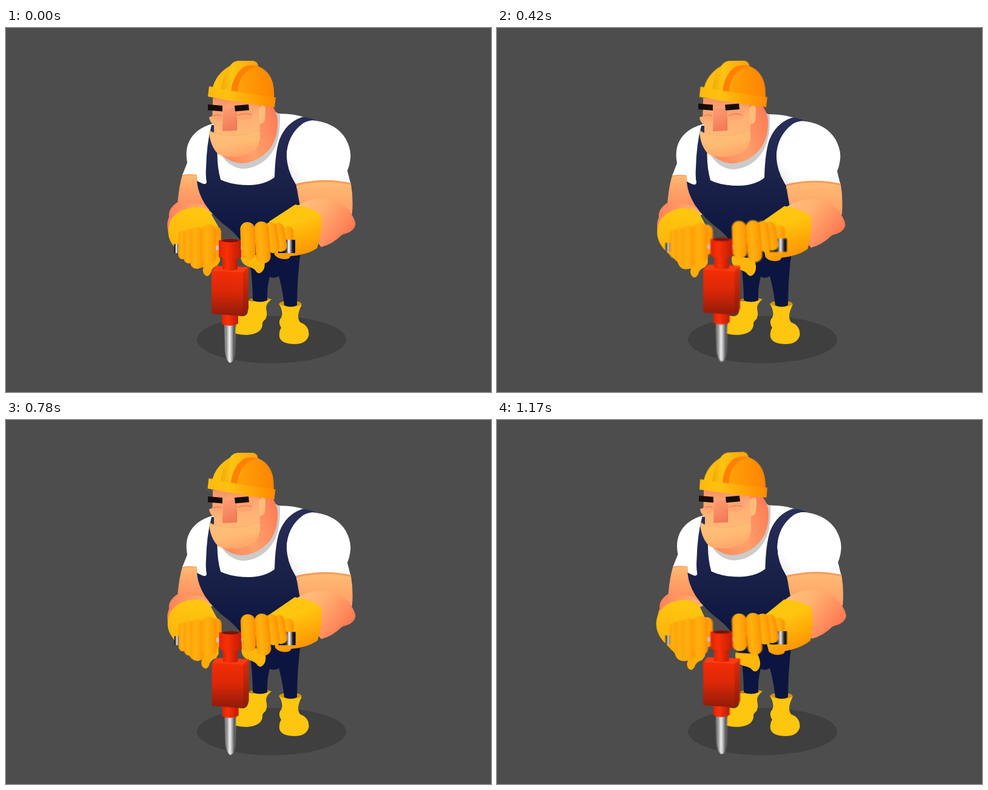
An HTML page for the animation above (1.2 s loop, 800 px wide and 600 px high).

```html
<!DOCTYPE html>
<html lang="en">
<head>
<meta charset="utf-8">
<title>Worker with jackhammer</title>
<style>
html, body { margin: 0; width: 100%; height: 100%; overflow: hidden; background: #4d4d4d; }
svg { display: block; width: 100vw; height: 100vh; }
</style>
</head>
<body>
<svg viewBox="0 0 800 600">
<defs>
  <linearGradient id="navy" x1="0" y1="0" x2="0" y2="1"><stop offset="0" stop-color="#292f58"/><stop offset=".5" stop-color="#1a2149"/><stop offset="1" stop-color="#0a143e"/></linearGradient>
  <linearGradient id="sleeve" x1="0" y1=".9" x2=".2" y2=".75"><stop offset="0" stop-color="#e9e9ec"/><stop offset="1" stop-color="#fff"/></linearGradient>
  <linearGradient id="neck" x1="0" y1=".7" x2="1" y2=".3"><stop offset=".1" stop-color="#ff8a5c"/><stop offset=".5" stop-color="#ffa06c"/><stop offset="1" stop-color="#ff7d55"/></linearGradient>
  <linearGradient id="face" x1="0" y1="0" x2="0" y2="1"><stop offset="0" stop-color="#f58f66"/><stop offset=".35" stop-color="#ffae74"/><stop offset="1" stop-color="#ffbc77"/></linearGradient>
  <linearGradient id="jaw" x1=".2" y1="0" x2=".6" y2="1"><stop offset="0" stop-color="#ffc07a"/><stop offset=".55" stop-color="#ffba73"/><stop offset="1" stop-color="#ffa468"/></linearGradient>
  <linearGradient id="nose" x1="0" y1="0" x2=".3" y2="1"><stop offset="0" stop-color="#ff9d72"/><stop offset="1" stop-color="#f27c58"/></linearGradient>
  <linearGradient id="arm" x1="0" y1="0" x2="0" y2="1"><stop offset="0" stop-color="#ffbc74"/><stop offset=".4" stop-color="#ffa369"/><stop offset="1" stop-color="#ff8a5c"/></linearGradient>
  <linearGradient id="foreR" x1="0" y1="0" x2="1" y2=".6"><stop offset=".1" stop-color="#ffc07a"/><stop offset=".45" stop-color="#ffb070"/><stop offset="1" stop-color="#ff7652"/></linearGradient>
  <linearGradient id="foreL"><stop offset="0" stop-color="#ff8059"/><stop offset="1" stop-color="#ffb573"/></linearGradient>
  <linearGradient id="dome"><stop offset="0" stop-color="#ffc410"/><stop offset=".35" stop-color="#fdb30c"/><stop offset=".45" stop-color="#ff9f08"/><stop offset="1" stop-color="#ff8400"/></linearGradient>
  <linearGradient id="ridge"><stop offset="0" stop-color="#eea905"/><stop offset=".3" stop-color="#ffc412"/><stop offset="1" stop-color="#ffa108"/></linearGradient>
  <linearGradient id="brim"><stop offset="0" stop-color="#ffb90e"/><stop offset=".3" stop-color="#fdc010"/><stop offset="1" stop-color="#ff8a00"/></linearGradient>
  <linearGradient id="gloveL" x1=".5" y1="0" x2=".4" y2="1"><stop offset=".1" stop-color="#ffc50f"/><stop offset=".65" stop-color="#ffb30a"/><stop offset="1" stop-color="#ffa808"/></linearGradient>
  <linearGradient id="gloveR" x1=".3" y1="0" x2=".65" y2="1"><stop offset=".35" stop-color="#ffc50f"/><stop offset="1" stop-color="#ff8f00"/></linearGradient>
  <linearGradient id="finger"><stop offset="0" stop-color="#ffa006"/><stop offset=".35" stop-color="#ffb110"/><stop offset=".7" stop-color="#ffa409"/><stop offset="1" stop-color="#ff8d02"/></linearGradient>
  <linearGradient id="grip"><stop offset="0" stop-color="#111"/><stop offset=".2" stop-color="#444"/><stop offset=".42" stop-color="#fff"/><stop offset=".75" stop-color="#222"/><stop offset="1" stop-color="#000"/></linearGradient>
  <linearGradient id="steel"><stop offset="0" stop-color="#808080"/><stop offset=".2" stop-color="#909090"/><stop offset=".45" stop-color="#f4f4f4"/><stop offset=".65" stop-color="#aaa"/><stop offset=".85" stop-color="#505050"/><stop offset="1" stop-color="#888"/></linearGradient>
  <linearGradient id="tube"><stop offset="0" stop-color="#dc2504"/><stop offset=".35" stop-color="#fb3006"/><stop offset="1" stop-color="#bd1b06"/></linearGradient>
  <linearGradient id="front" x1="0" y1="0" x2="0" y2="1"><stop offset="0" stop-color="#f42d06"/><stop offset=".45" stop-color="#dc2807"/><stop offset="1" stop-color="#8f1b0a"/></linearGradient>
  <linearGradient id="side" x1="0" y1="0" x2="0" y2="1"><stop offset="0" stop-color="#dc2c0a"/><stop offset="1" stop-color="#8c1a08"/></linearGradient>
  <filter id="shake" filterUnits="userSpaceOnUse" x="250" y="300" width="260" height="270" color-interpolation-filters="sRGB"><feGaussianBlur/></filter>
  <filter id="soft" color-interpolation-filters="sRGB"><feGaussianBlur stdDeviation=".5"/></filter>
</defs>

<rect width="800" height="600" fill="#4d4d4d"/>
<ellipse cx="438" cy="513.5" rx="123" ry="39" fill="#3f3f3f"/>

<g fill="#ffc60f">
  <path d="M400 448Q418 440 438 447L425 456Z" fill="#cf9500"/>
  <ellipse cx="469" cy="455" rx="18.5" ry="5.5" fill="#cf9500"/>
  <path d="M398 449Q418 454 438 447Q428 455 429 463Q432 472 428 480Q422 484 423 490Q421 504 398 506Q385 506 377 503L383 474Q397 478 399 468Z"/>
  <path d="M450 455Q468 464 488 456Q483 465 482 474Q482 484 487 486Q500 491 499.500 506Q496 521 476 521Q454 521 451 509Q450 500 454 494Q449 487 452 480Q457 474 455 467Q454 460 450 455Z"/>
</g>
<path d="M385 345L404 398Q407 425 407 449Q419 454 431 449Q430 428 435 410Q442 414 450 409Q456 430 459 457Q470 462 480 457Q480 410 487 360Z" fill="#0b153f"/>

<g id="body">
  <path d="M291 242Q302 239 318 242L322 270L345 300L310 302L283 290Q285 262 291 242Z" fill="url(#arm)"/>
  <path d="M291 242.500Q302 240 316 242" fill="none" stroke="#f79b58" stroke-width="2.500"/>
  <path d="M283 287Q298 288 324 291L341 306L272 346Q262 327 269 311Q267 298 283 287Z" fill="url(#foreL)"/>
  <path d="M340 158L445 141Q478 141 493 148L520 156L500 260L430 275L340 265L316 253L315 242Q303 240 291 242L299 222Q295 202 302 187Q312 166 340 158Z" fill="#fff"/>
  <path d="M339 160Q331 190 330 230Q329 245 331 254Q330 259 323 256L315 252Q316 270 328 290Q343 312 366 329Q380 340 388 352L460 365Q478 340 485 290Q480 275 479 258Q464 235 463 210Q464 176 490 157Q500 151 513 153Q499 146 488 147Q462 156 451 184Q444 205 443 246Q428 258 402 259Q372 259 354 250Q347 225 349 195L352 160Z" fill="url(#navy)"/>
  <path d="M512 153Q545 158 560 182Q570 200 568 215Q567 226 563 235L569 259Q525 246 479 259Q463 235 463 209Q464 178 490 158Q500 151 512 153Z" fill="url(#sleeve)"/>
  <path d="M354 208Q370 232 393 232Q426 229 443 198Q453 178 452 143L440 135Z" fill="#cbcbcb"/>
  <path d="M479 258Q525 247 569 257Q573 280 571 305L556 340L520 361L480 300Q486 293 484 288Z" fill="url(#arm)"/>
  <path d="M479 258Q525 247 569 257" fill="none" stroke="#f79b58" stroke-width="3"/>
  <path d="M470 302Q490 282 520 281Q552 282 568 304Q578 319 576 326Q572 337 555 340Q538 357 520 361Z" fill="url(#foreR)"/>
</g>

<g id="head">
  <path d="M352 206Q370 223 390 223Q418 221 436 198Q449 180 448 152Q446 132 432 122L345 118Z" fill="url(#neck)"/>
  <path d="M341 115L416 122L417 131Q426 124 428 132L427 151Q426 158 419 158L419 185L343 185L343 160Q336 155 335 147L341 145Z" fill="url(#face)"/>
  <path d="M417 132Q427 123 428 134L427 151Q426 158 418 158Z" fill="#ffbc79"/>
  <path d="M335 169Q344 176 372 177Q397 177 419 169Q419 188 415 196Q405 210 378 212Q358 213 350 208Q336 194 335 169Z" fill="url(#jaw)"/>
  <path d="M336 169Q344 176 372 177Q397 177 418 169" fill="none" stroke="#ffac6e"/>
  <path d="M340 136L357 138L357 152Q349 156 340 148ZM380 137L408 136Q411 146 401 150Q390 153 380 149Z" fill="#ff9b6d" opacity=".5"/>
  <path d="M358 132L381 132L381 169L357 170Z" fill="url(#nose)"/>
  <path d="M380.500 148V169" stroke="#d96a48" opacity=".6"/>
  <path d="M343 145Q349 141 356 145M383 144Q393 139 405 143" fill="none" stroke="#e87d58" stroke-width="1.400"/>
</g>
<path id="brows" d="M333 126L357 128L357 137.500L333 135.500ZM377 128L400 126L401 135.500L378 137.500Z" fill="#190b09"/>
<g id="helmet" filter="url(#soft)">
  <path d="M340 102Q345 76 370 62Q375 54 384 54L407 54Q415 55 416 63Q434 70 440 90Q443 102 442 118Z" fill="url(#dome)"/>
  <path d="M354 104Q358 76 371 61Q376 54 387 54L407 54Q415 55 416 63Q402 64 393 74L380 108Z" fill="url(#ridge)"/>
  <path d="M371 107Q373 80 390 66Q400 59 416 63Q398 67 390 80Q383 92 382 108Z" fill="#ff8100"/>
  <path d="M335 96Q385 107 445 114.500L443 131Q384 123 333 113Z" fill="url(#brim)"/>
</g>

<g id="left" fill="url(#gloveL)">
  <path d="M271 318Q285 297 312 295Q330 295 338 306L350 327L353 384L349 391Q339 395 338 403Q333 413 327 406Q323 400 326 394Q308 400 303 384L283 367C268 352 264 338 271 318Z"/>
</g>
<g id="right" fill="url(#gloveR)">
  <path d="M434 319L477 291Q505 296 520 309Q522 338 513 363Q497 374 469 376Q469 381 459 381Q449 381 443 374Z"/>
  <path d="M388 370Q384 387 399 393Q410 396 413 402Q419 408 425 398Q429 390 424 376Z" fill="#ffb70c"/>
</g>

<g id="drill" filter="url(#shake)">
  <rect x="455" y="327" width="19" height="26" rx="9" fill="url(#finger)"/>
  <rect x="277" y="356" width="10" height="15" rx="1" fill="url(#grip)"/>
  <path d="M449 364H476V371H449Z" fill="#111"/>
  <rect x="459" y="349" width="18" height="22" rx="1" fill="url(#grip)"/>
  <g id="fingers" fill="url(#finger)"></g>
  <path d="M346 359H352V366H346ZM383 359H389V366H383Z" fill="#c4c4c4"/>
  <path d="M360 488H379L378 538Q375 552 369 552Q362 547 361 531Z" fill="url(#steel)"/>
  <path d="M356 470H383V487Q370 494 356 488Z" fill="url(#tube)"/>
  <path d="M339 401L346 392L400 394L391 404Z" fill="#ff3d12"/>
  <path d="M391 403L400 394V462Q399 471 391 475Z" fill="url(#side)"/>
  <path d="M339 400L391 403V475L339 471Z" fill="url(#front)"/>
  <path d="M357 376H382V398Q370 402 357 398Z" fill="url(#tube)"/>
  <path d="M351 350Q369 345 387 350L388 378Q370 384 351 378Z" fill="url(#tube)"/>
  <ellipse cx="369.500" cy="350.500" rx="14" ry="2.800" fill="#7b1207"/>
</g>
</svg>

<script>
const $ = id => document.getElementById(id);
const STEP = 30, COUNT = 40;

// x, y, width, height, tilt
const fingers = [
  [334, 326, 21, 50, 0], [284, 334, 15, 47, 0], [293, 331, 18, 57, 0], [304, 328, 22, 69, 0], [322, 324, 25, 65, 0],
  [441, 321, 20, 48, -10], [429, 320, 20, 51, -8], [411, 319, 24, 69, -4], [387, 320, 24, 62, -2]
];
for (const [x, y, width, height, tilt] of fingers) {
  const r = document.createElementNS("http://www.w3.org/2000/svg", "rect");
  const attrs = { x, y, width, height, rx: width / 2.1, transform: `rotate(${tilt} ${x + width / 2} ${y + height / 2})` };
  for (const k in attrs) r.setAttribute(k, attrs[k]);
  $("fingers").append(r);
}

// Key poses; each channel wanders between them.
const keys = [0, 5, 14, 20, 26, 35, 39, 40];
const tracks = {
  bodyX:   [0, 1, -2, -1.4, 0, -.7, -.6],
  bodyY:   [0, .4, 1, -.6, 0, -.4, -.5],
  headX:   [0, 0, -1, -.3, 0, 0, 0],
  headY:   [0, 0, .3, -.3, 0, 0, -.3],
  browY:   [0, -.9, -1.4, .3, 0, 0, -1.3],
  helmetX: [0, 1, .8, -1, -.5, 0, .8],
  helmetY: [0, .4, 0, -1, 0, .2, -.8],
  helmetR: [0, -1, -.6, -1.2, 0, 0, -2.4],
  drillX:  [0, -1.8, 1, .6, .6, -3, 1],
  drillY:  [0, -1.8, -2, -.8, .2, 1.3, -1],
  leftR:   [0, .4, 2, 1.3, 1.4, .6, 5.7],
  rightR:  [0, -1.2, -1.9, -1, -1.3, -.4, -6],
  blurX:   [.6, 1.7, 1.3, .9, .4, 1.6, 1.2],
  blurY:   [.3, 1, .9, .4, .2, .7, .5]
};
const jitter = { drillX: 1.2, drillY: 1, leftR: .8, rightR: .8, helmetX: .3, helmetY: .3 };

function sample(name, frame, seed) {
  const v = tracks[name];
  let i = 0;
  while (frame >= keys[i + 1]) i++;
  const u = (frame - keys[i]) / (keys[i + 1] - keys[i]);
  const ease = u * u * (3 - 2 * u);
  const noise = Math.sin(frame * 2.4 + seed * 1.9) * Math.sin(Math.PI * u);
  return v[i] + (v[(i + 1) % v.length] - v[i]) * ease + (jitter[name] || 0) * noise;
}

const move = (id, x, y, turn = "") => $(id).setAttribute("transform", `translate(${x} ${y}) ${turn}`);

function draw(time) {
  const frame = Math.floor(time / STEP) % COUNT, p = {};
  Object.keys(tracks).forEach((name, i) => p[name] = sample(name, frame, i));
  move("body", p.bodyX, p.bodyY);
  move("head", p.headX, p.headY);
  move("brows", p.headX, p.browY);
  move("helmet", p.helmetX, p.helmetY, `rotate(${p.helmetR} 390 112)`);
  move("left", p.bodyX, p.bodyY, `rotate(${p.leftR} 290 292)`);
  move("right", p.bodyX, p.bodyY, `rotate(${p.rightR} 525 320)`);
  move("drill", p.drillX, p.drillY);
  $("shake").firstChild.setAttribute("stdDeviation", `${p.blurX} ${p.blurY}`);
}

function tick() {
  draw(performance.now());
  requestAnimationFrame(tick);
}
tick();
</script>
</body>
</html>
```
